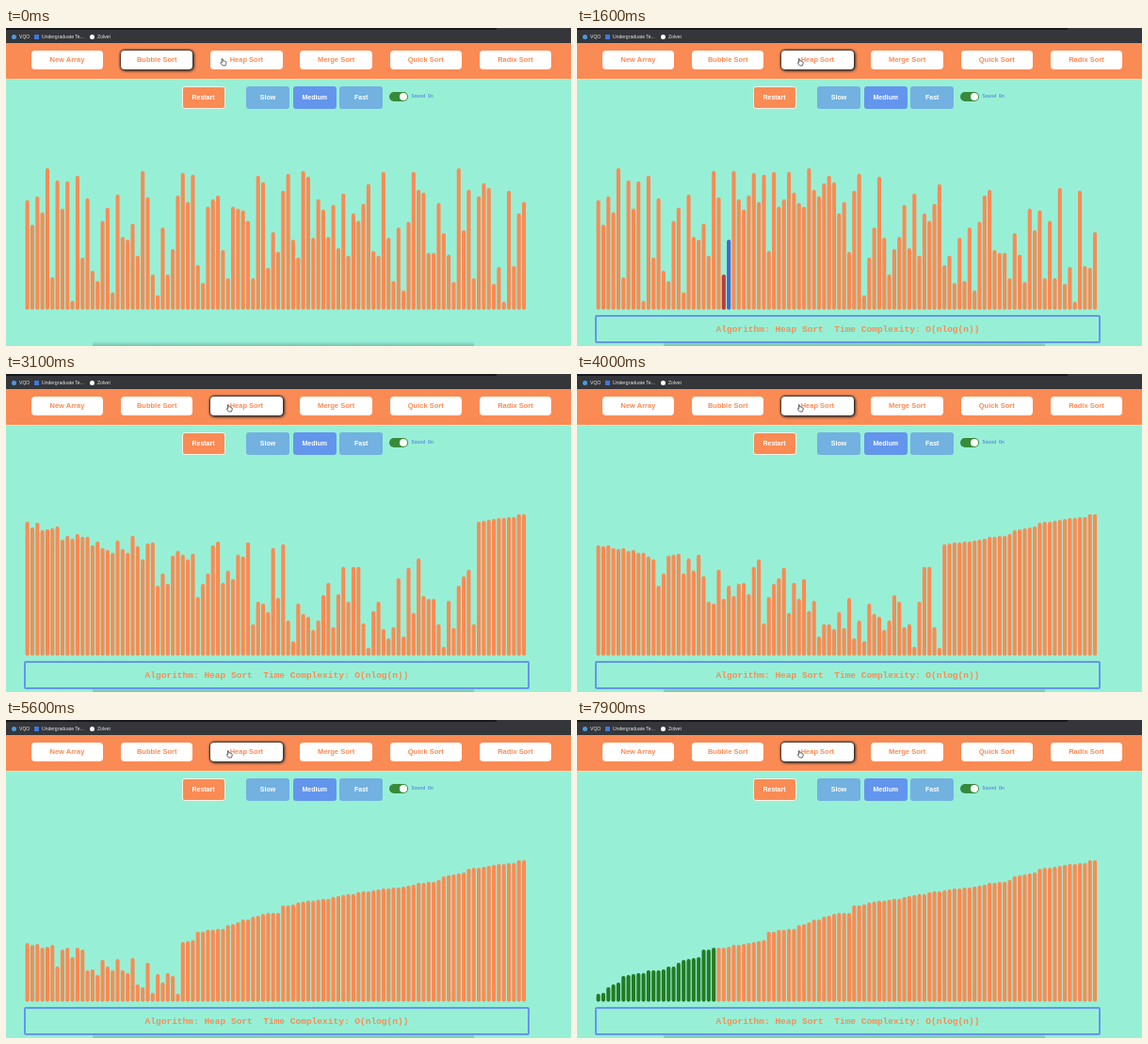
An HTML page with a canvas for the animation above (8000 ms loop, 600 by 338 pixels).

```html
<!DOCTYPE html>
<html lang="en">
<head>
<meta charset="utf-8">
<title>Sorting visualizer</title>
<style>
  html, body { margin: 0; width: 100%; height: 100%; overflow: hidden; background: #97f0d6; }
  #stage { position: relative; width: 600px; height: 338px; overflow: hidden; background: #97f0d6;
    font-family: Arial, "Liberation Sans", sans-serif; }
  #stage * { position: absolute; box-sizing: border-box; white-space: pre; }
  #tabs { left: 0; top: 0; width: 600px; height: 16px; background: #34363a; }
  #tabs i { left: 0; top: 0; width: 521px; height: 2px; background: #17181b; }
  #tabs span { top: 5px; line-height: 8px; font-size: 5.1px; color: #e6e7e9; }
  #tabs b { width: 5px; height: 5px; top: 6.5px; }
  #band { left: 0; top: 16px; width: 600px; height: 39px; background: #fa8b54; border-bottom: 1px solid #d9e3c4; }
  .btn { font-weight: bold; text-align: center; }
  .algo { top: 24px; width: 76.5px; height: 19.5px; line-height: 19.5px; border-radius: 4px;
    background: #fff; color: #fa8b54; font-size: 7.5px; }
  .algo.on { box-shadow: 0 0 2px 1px #33302c, 1px 1px 3px 1px #4a3a30; }
  .ctl { top: 62px; height: 23.5px; line-height: 23.5px; width: 46px; border-radius: 3px;
    color: #fff; font-size: 7px; background: #72b1e0; }
  #restart { left: 186.5px; background: #fa8b54; border: 1px solid #fff2e8; line-height: 21.5px; }
  #toggle { left: 407px; top: 68px; width: 20px; height: 9.5px; border-radius: 5px; background: #388a3a; }
  #toggle i { right: .7px; top: .7px; width: 8px; height: 8px; border-radius: 50%; background: #fff; }
  .mono { font-family: "Courier New", "Liberation Mono", monospace; font-weight: bold; }
  #sound { left: 430.5px; top: 69px; line-height: 8px; font-size: 4.9px; color: #5f8fe0; }
  #dock { left: 92px; top: 333px; width: 405px; height: 5px;
    background: linear-gradient(rgba(60,110,95,0), rgba(60,110,95,.35)); }
  #info { left: 19px; top: 304.5px; width: 537px; height: 30.5px; border: 2px solid #6495ed; border-radius: 2px;
    line-height: 28px; font-size: 9.52px; color: #fa8b54; text-align: center; }
  #bars { left: 0; top: 0; }
  #hand { left: 0; top: 0; }
</style>
</head>
<body>
<div id="stage">
  <div id="tabs"><i></i>
    <b style="left:5.5px;background:#4b9be0;border-radius:50%"></b><span style="left:14px">VQO</span>
    <b style="left:30px;background:#3f78d8"></b><span style="left:38px">Undergraduate Te...</span>
    <b style="left:88.5px;background:#fff;border-radius:50%"></b><span style="left:97px">Zolvet</span>
  </div>
  <div id="band"></div>
  <div id="dock"></div>
  <div class="btn ctl" id="restart">Restart</div>
  <div class="btn ctl" style="left:255px">Slow</div>
  <div class="btn ctl" style="left:304.7px;background:#6495ed">Medium</div>
  <div class="btn ctl" style="left:354.2px">Fast</div>
  <div id="toggle"><i></i></div>
  <div id="sound" class="mono">Sound On</div>
  <canvas id="bars" width="600" height="338"></canvas>
  <div id="info" class="mono">Algorithm: Heap Sort  Time Complexity: O(nlog(n))</div>
  <svg id="hand" width="8" height="9" viewBox="0 0 8 9">
    <path d="M2 .8 Q2.8 .2 3.2 1.2 L3.6 3.1 Q4.3 2.6 4.8 3.3 Q5.5 3 5.9 3.7 Q6.8 3.6 6.9 4.6 L6.7 6.6 L6 8 H3.2 L.9 5.4 Q.8 4.3 2.3 5 Z"
      fill="#fff" stroke="#222" stroke-width=".7"/>
  </svg>
</div>
<script>
const LOOP = 8000, CLICK = 520, START = 577, STEP = 42, BASE = 299.5;
const ORANGE = '#fa8b54', RED = '#bd3d33', BLUE = '#4d62cd', GREEN = '#247a24';
const stage = document.getElementById('stage');
const ctx = document.getElementById('bars').getContext('2d');
const info = document.getElementById('info');
const hand = document.getElementById('hand');

const tops = [
  183, 209, 179, 196, 149, 265, 162, 192, 163, 290, 157, 244, 181, 258, 269, 205, 191, 281, 177, 222,
  225, 208, 242, 152, 180, 262, 284, 212, 262, 235, 178, 154, 185, 156, 252, 271, 190, 182, 178, 236,
  266, 190, 192, 194, 205, 266, 157, 164, 255, 217, 238, 173, 155, 225, 244, 152, 158, 223, 182, 193,
  222, 188, 234, 176, 242, 197, 205, 187, 166, 237, 242, 153, 223, 269, 212, 279, 206, 153, 172, 175,
  239, 239, 186, 218, 241, 270, 149, 215, 172, 266, 179, 165, 170, 272, 254, 291, 173, 253, 197, 185];
const N = tops.length, HALF = N / 2;

const algos = ['New Array', 'Bubble Sort', 'Heap Sort', 'Merge Sort', 'Quick Sort', 'Radix Sort'].map((name, i) => {
  const el = document.createElement('div');
  el.className = 'btn algo';
  el.textContent = name;
  el.style.left = 26.7 + 95.2 * i + 'px';
  stage.insertBefore(el, hand);
  return el;
});

function swap(a, i, j) { [a[i], a[j]] = [a[j], a[i]]; }

// A lower top means a taller bar, so the root holds the smallest top.
function sift(a, i, n) {
  for (;;) {
    let best = i;
    for (const c of [2 * i + 1, 2 * i + 2]) if (c < n && a[c] < a[best]) best = c;
    if (best === i) return;
    swap(a, i, best);
    i = best;
  }
}

// One snapshot per step: build the heap, then extract one bar at a time.
function record() {
  const a = tops.slice(), states = [a.slice()];
  for (let i = HALF - 1; i >= 0; i--) {
    sift(a, i, N);
    states.push(a.slice());
  }
  for (let end = N - 1; end >= 0; end--) {
    swap(a, 0, end);
    sift(a, 0, end);
    states.push(a.slice());
  }
  return states;
}
const states = record();

function barColor(i, k) {
  if (k >= 0 && k < HALF) {
    const cur = HALF - 1 - k;
    if (i === cur) return RED;
    if (i === cur + 1) return BLUE;
  }
  return i < k - HALF - N ? GREEN : ORANGE;
}

function draw(t) {
  const k = Math.floor((t - START) / STEP);
  const a = states[Math.min(Math.max(k, 0), states.length - 1)];
  ctx.clearRect(0, 0, 600, 338);
  a.forEach((top, i) => {
    ctx.fillStyle = barColor(i, k);
    ctx.beginPath();
    ctx.roundRect(20.6 + 5.327 * i, top, 4.1, BASE - top, 2);
    ctx.fill();
  });

  const clicked = t >= CLICK;
  info.style.visibility = clicked ? 'visible' : 'hidden';
  algos[1].classList.toggle('on', !clicked);
  algos[2].classList.toggle('on', clicked);
  const p = Math.min(Math.max((t - 50) / 300, 0), 1);
  hand.style.transform = `translate(${227 + 6.3 * p * (2 - p)}px, 32px)`;
}

const t0 = performance.now();
function frame() {
  draw((performance.now() - t0) % LOOP);
  requestAnimationFrame(frame);
}
draw(0);
requestAnimationFrame(frame);
</script>
</body>
</html>
```
